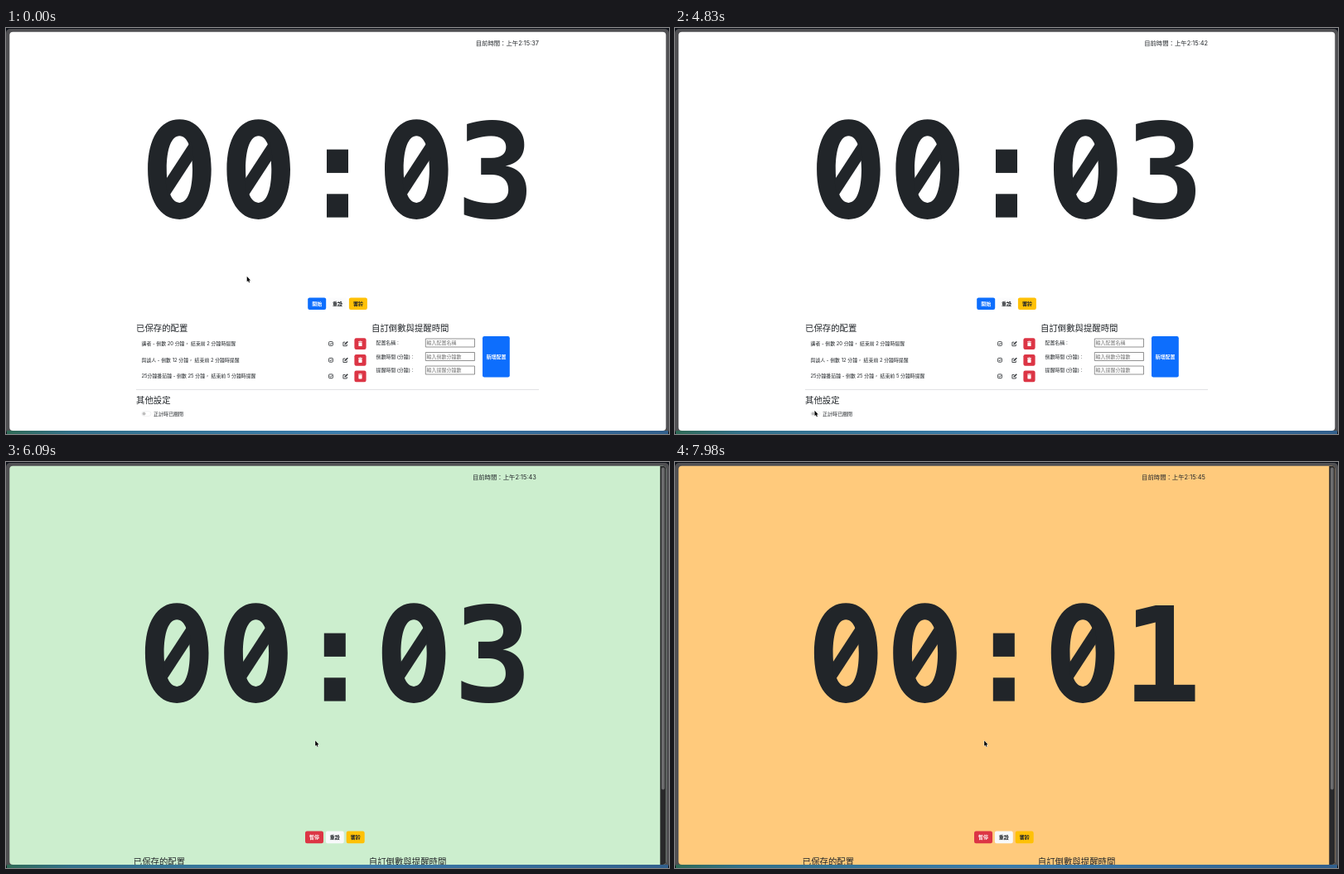
Write an HTML page with a canvas that moves like this. It is 800 px wide and 490 px high and loops after 8 s.

```html
<!DOCTYPE html>
<html lang="zh-Hant">
<head>
<meta charset="utf-8">
<title>倒數計時器</title>
<style>
html, body { margin: 0; width: 100%; height: 100%; overflow: hidden; background: #222; }
canvas { display: block; }
</style>
</head>
<body>
<canvas id="stage" width="800" height="490"></canvas>
<script>
const ctx = document.getElementById('stage').getContext('2d');
const LOOP = 8000;
const START = 5880;
const INK = '#212529', BLUE = '#0d6efd', RED = '#dc3545', YELLOW = '#ffc107';
const WHITE = [255, 255, 255], GREEN = [184, 231, 186], ORANGE = [255, 202, 124];
const SANS = 'Inter, "Noto Sans CJK TC", "Noto Sans CJK", sans-serif';
const clockTicks = [490, 1470, 2520, 3500, 4620, 5670, 6720, 7700];
// time, x, y of the pointer tip
const pointerPath = [
  [70, 290.7, 299.8], [1000, 157, 447], [1680, 198.6, 446], [2660, 198.6, 446],
  [2730, 197, 447], [3010, 197, 447], [3200, 168.5, 461.7], [4830, 168.5, 461.7],
  [5600, 373.2, 336.3]
];

const clamp01 = v => Math.max(0, Math.min(1, v));
const lerp = (a, b, p) => a + (b - a) * p;
const smooth = p => p * p * (3 - 2 * p);
const mix = (a, b, p) => a.map((v, i) => lerp(v, b[i], p));
const rgb = c => `rgb(${c.map(Math.round).join(',')})`;

// The CSS "ease" curve
function ease(x) {
  if (x <= 0 || x >= 1) return clamp01(x);
  let lo = 0, hi = 1, s;
  for (let i = 0; i < 24; i++) {
    s = (lo + hi) / 2;
    const at = 0.75 * s * (1 - s) ** 2 + 0.75 * s * s * (1 - s) + s ** 3;
    if (at < x) lo = s; else hi = s;
  }
  return 0.3 * s * (1 - s) ** 2 + 3 * s * s * (1 - s) + s ** 3;
}

function box(x, y, w, h, r, fill, stroke, line = 0.8) {
  ctx.beginPath();
  ctx.roundRect(x, y, w, h, r);
  if (fill) { ctx.fillStyle = fill; ctx.fill(); }
  if (stroke) { ctx.strokeStyle = stroke; ctx.lineWidth = line; ctx.stroke(); }
}

function lines(color, width, ...paths) {
  ctx.strokeStyle = color;
  ctx.lineWidth = width;
  ctx.beginPath();
  for (const path of paths) {
    path.forEach(([x, y], i) => i ? ctx.lineTo(x, y) : ctx.moveTo(x, y));
  }
  ctx.stroke();
}

function polygon(points, fill) {
  ctx.beginPath();
  points.forEach(([x, y]) => ctx.lineTo(x, y));
  ctx.closePath();
  ctx.fillStyle = fill;
  ctx.fill();
}

// y is the optical middle of the line
function text(str, x, y, size, { color = INK, weight = 400, align = 'left' } = {}) {
  ctx.font = `${weight} ${size}px ${SANS}`;
  ctx.textAlign = align;
  ctx.fillStyle = color;
  ctx.fillText(str, x, y + size * 0.37);
}

function button(label, x, y, w, h, fill, color) {
  box(x, y, w, h, 2.2, fill);
  text(label, x + w / 2, y + h / 2, 6, { color, weight: 700, align: 'center' });
}

function desktop() {
  ctx.fillStyle = '#0c1018';
  ctx.fillRect(0, 0, 800, 490);
  box(0, 1, 800, 489, 5, '#505053');
  const bottom = ctx.createLinearGradient(0, 0, 800, 0);
  bottom.addColorStop(0, '#2f6a55');
  bottom.addColorStop(0.1, '#32708a');
  bottom.addColorStop(0.5, '#3a7cac');
  bottom.addColorStop(1, '#315f8c');
  ctx.fillStyle = bottom;
  ctx.fillRect(1, 486, 798, 4);
}

function oval(rx, ry) {
  const k = 0.62;
  ctx.moveTo(rx, 0);
  ctx.bezierCurveTo(rx, ry * k, rx * k, ry, 0, ry);
  ctx.bezierCurveTo(-rx * k, ry, -rx, ry * k, -rx, 0);
  ctx.bezierCurveTo(-rx, -ry * k, -rx * k, -ry, 0, -ry);
  ctx.bezierCurveTo(rx * k, -ry, rx, -ry * k, rx, 0);
}

function slashedZero(x, y) {
  ctx.save();
  ctx.translate(x, y);
  ctx.beginPath();
  oval(38.3, 60.3);
  oval(15.6, 40.3);
  ctx.fillStyle = INK;
  ctx.fill('evenodd');
  polygon([[-17, 13], [14, -34.5], [17, -13], [-14, 34.5]], INK);
  ctx.restore();
}

function timer(seconds, baseline) {
  const step = 95.3;
  [...`00:0${seconds}`].forEach((ch, i) => {
    const x = 400 + (i - 2) * step;
    if (ch === '0') slashedZero(x, baseline - 58);
    else if (ch === ':') {
      ctx.fillStyle = INK;
      ctx.fillRect(x - 13, baseline - 82, 26, 28.3);
      ctx.fillRect(x - 13, baseline - 28.3, 26, 28.3);
    } else {
      ctx.font = '700 158.3px "DejaVu Sans Mono", monospace';
      ctx.textAlign = 'center';
      ctx.fillStyle = INK;
      ctx.fillText(ch, x, baseline);
    }
  });
}

function savedRow(label, y) {
  text(label, 163.5, y, 5.9);
  box(389.6, y - 2.4, 4.8, 4.8, 0.8, null, INK, 0.8);
  lines(INK, 0.8, [[390.8, y], [391.7, y + 1], [393.4, y - 1]]);
  lines(INK, 0.8, [[409.5, y - 1.8], [406.9, y - 1.8], [406.9, y + 2.7], [411.3, y + 2.7], [411.3, y + 0.6]]);
  lines(INK, 1.3, [[408.7, y + 1], [412.3, y - 2.5]]);
  box(420.4, y - 6.7, 14.2, 13.6, 2.2, RED);
  lines('#fff', 0.8, [[425, y - 2.3], [430, y - 2.3]], [[426.7, y - 2.9], [428.3, y - 2.9]]);
  box(425.4, y - 1.5, 4.2, 4.6, 0.6, '#fff');
}

function settings(selected) {
  text('已保存的配置', 157, 362.3, 10.4, { weight: 500 });
  savedRow('講者 - 倒數 20 分鐘， 結束前 2 分鐘時提醒', 381);
  savedRow('與談人 - 倒數 12 分鐘， 結束前 2 分鐘時提醒', 400.8);
  savedRow('25分鐘番茄鐘 - 倒數 25 分鐘， 結束前 5 分鐘時提醒', 420.3);

  text('自訂倒數與提醒時間', 441, 362.3, 10.4, { weight: 500 });
  [['配置名稱：', '輸入配置名稱'],
   ['倒數時間 (分鐘)：', '輸入倒數分鐘數'],
   ['提醒時間 (分鐘)：', '輸入提醒分鐘數']].forEach(([label, hint], i) => {
    const y = 380 + i * 16.5;
    text(label, 446.5, y, 5.9);
    box(506.3, y - 5, 59.2, 10, 0, '#fff', '#767676', 0.8);
    text(hint, 507.6, y, 6, { color: '#757575' });
  });
  button('新增配置', 575, 372, 32.8, 49.5, BLUE, '#fff');

  lines('#d9dadb', 0.8, [[157, 436.4], [643, 436.4]]);
  if (selected > 0) {
    ctx.fillStyle = '#a9d0f8';
    ctx.fillRect(157, 443, 42 * selected, 12.3);
  }
  text('其他設定', 157, 449.2, 10.4, { weight: 500 });
  box(163.6, 462.6, 11.4, 5.8, 2.9, '#fff', '#e3e4e6', 0.5);
  ctx.beginPath();
  ctx.arc(166.5, 465.5, 2, 0, 7);
  ctx.fillStyle = '#bfbfbf';
  ctx.fill();
  text('正計時已關閉', 178, 465.4, 6);
}

function scrollbar() {
  ctx.fillStyle = '#29292b';
  ctx.fillRect(789.3, 5, 7, 481);
  box(791, 6.5, 3.8, 389, 1.9, '#6c6c6e');
}

function pointerAt(t) {
  const next = pointerPath.findIndex(p => p[0] > t);
  if (next === 0) return pointerPath[0].slice(1);
  if (next < 0) return pointerPath.at(-1).slice(1);
  const [t0, ...from] = pointerPath[next - 1], [t1, ...to] = pointerPath[next];
  return mix(from, to, smooth((t - t0) / (t1 - t0)));
}

function pointer([x, y]) {
  ctx.save();
  ctx.translate(x, y);
  ctx.beginPath();
  [[0, 0], [0, 6.4], [1.4, 5.2], [2.4, 7.5], [3.4, 7], [2.4, 4.9], [4.3, 4.7]]
    .forEach(([px, py]) => ctx.lineTo(px, py));
  ctx.closePath();
  ctx.strokeStyle = '#fff';
  ctx.lineWidth = 1;
  ctx.stroke();
  ctx.fillStyle = '#000';
  ctx.fill();
  ctx.restore();
}

function background(t) {
  const green = mix(WHITE, GREEN, ease((t - START) / 500));
  return rgb(mix(green, ORANGE, ease((t - 6920) / 500)));
}

function draw(t) {
  const running = t >= START;
  const seconds = t < 6920 ? 3 : t < 7945 ? 2 : 1;
  const tick = clockTicks.filter(at => t >= at).length;
  const selected = t < 2690 ? clamp01((pointerAt(t)[0] - 157) / 41) * (t >= 1000) : 0;
  const hover = clamp01((t - 5540) / 150);
  const idle = mix([13, 110, 253], [11, 94, 215], hover);
  const action = rgb(mix(idle, [220, 53, 69], ease((t - START) / 150)));

  desktop();
  ctx.save();
  ctx.beginPath();
  ctx.roundRect(4.3, 4.8, 792, 481.2, 4);
  ctx.clip();
  ctx.fillStyle = background(t);
  ctx.fillRect(0, 0, 800, 490);

  ctx.save();
  if (running) ctx.translate(-3.2, 0);
  text(`目前時間：上午2:15:${37 + tick}`, 643, 18, 7.36, { align: 'right' });
  timer(seconds, running ? 288.6 : 228.6);
  if (running) ctx.translate(0, 120.2);
  button(running ? '暫停' : '開始', 364.2, 325.4, 22, 14.6, action, '#fff');
  button('重設', 389, 325.4, 22, 14.6, running ? '#f8f9fa' : '#fcfcfd', INK);
  button('響鈴', 413.9, 325.4, 22, 14.6, YELLOW, INK);
  settings(selected);
  ctx.restore();

  if (running) scrollbar();
  ctx.restore();
  pointer(pointerAt(t));
}

function frame() {
  draw(performance.now() % LOOP);
  requestAnimationFrame(frame);
}
frame();
</script>
</body>
</html>
```
